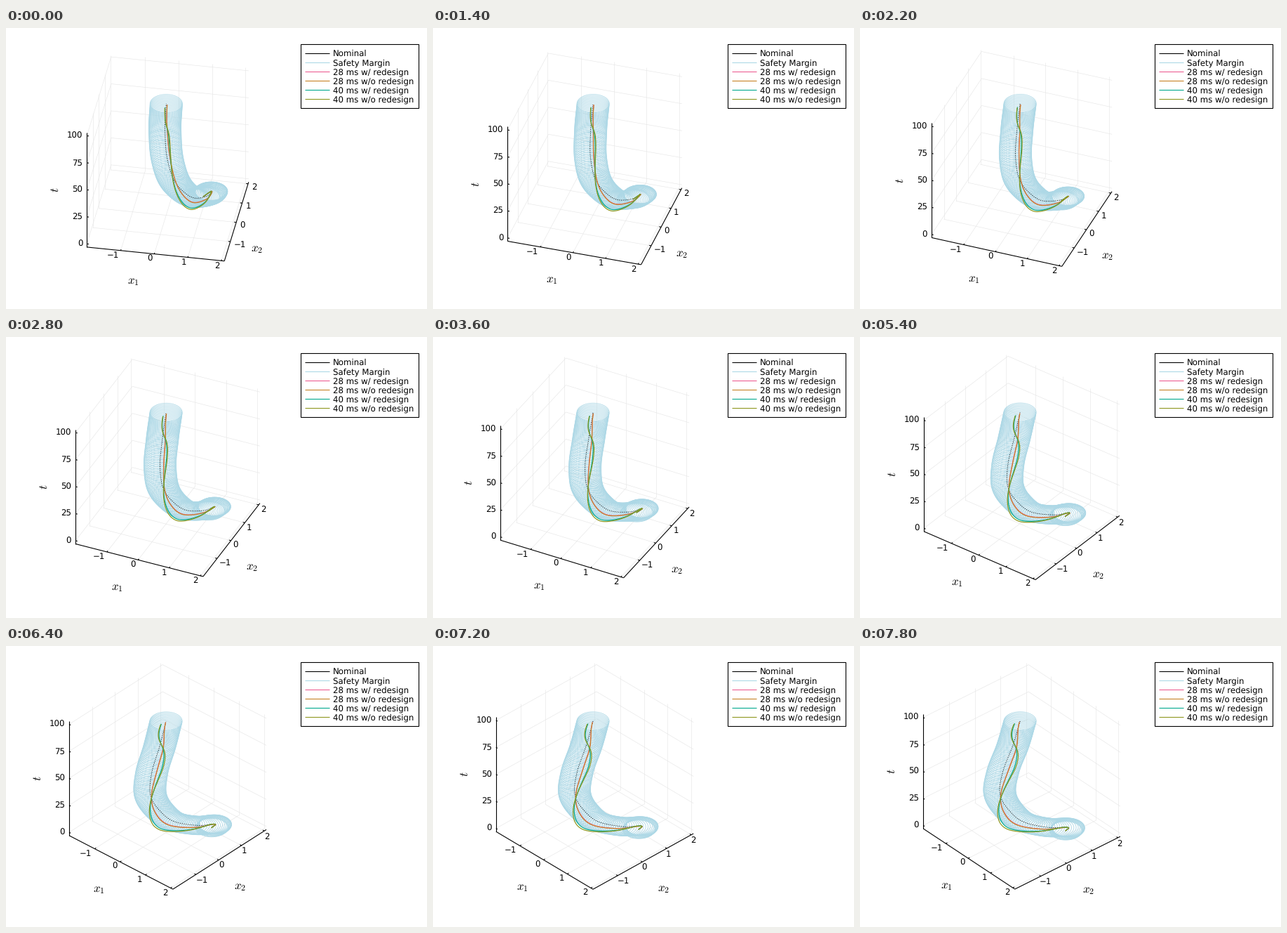
A matplotlib script for the animation above (8 s loop, 600x400 px).

```python
import numpy as np
import matplotlib.pyplot as plt
from matplotlib.animation import FuncAnimation
from matplotlib.collections import LineCollection
from matplotlib.patches import Rectangle

plt.rcParams.update({"font.family": "DejaVu Sans", "mathtext.fontset": "cm",
                     "text.hinting": "none"})

PX = 0.72                       # points per pixel at 100 dpi
FRAMES, STEP_MS = 40, 200
CX, CY = 230.5, 265.6           # middle of the box floor on screen
HALF = 99.5                     # half a box edge in pixels
LO, HI = -2.01, 2.09            # limits of x1 and x2
BOT, TOP = -3, 103              # limits of t
MID, SPAN = (LO + HI) / 2, (HI - LO) / 2
ELEV = np.radians(35)
START_AZ = 10                   # degrees, one more on each step
RADIUS = 0.475
TICKS = range(-1, 3)
Z_TICKS = range(0, 101, 25)
TICK = 0.06

LIGHT, PINK, ORANGE = "#add8e6", "#ed5e93", "#c68225"
TEAL, OLIVE = "#00a98d", "#8e971e"

# time, x1, x2 along the nominal run, relative to the middle of the box
KEYS = np.array([(0, .9, .93), (.08, 1.15, .8), (.18, 1.19, 0),
                 (.28, .94, -.72), (.4, .64, -1.08), (.53, .36, -1.17),
                 (.65, .13, -.85), (.8, -.02, -.35), (1, -.04, -.03)])


def nominal(s):
    """Cubic Hermite curve through the keys."""
    knots, pts = KEYS[:, 0], KEYS[:, 1:] + MID
    slope = np.gradient(pts, knots, axis=0)
    i = np.clip(np.searchsorted(knots, s, side="right") - 1, 0, len(knots) - 2)
    h = (knots[i + 1] - knots[i])[:, None]
    f = (s - knots[i])[:, None] / h
    g = 1 - f
    return (g * g * ((1 + 2 * f) * pts[i] + f * h * slope[i])
            + f * f * ((1 + 2 * g) * pts[i + 1] - g * h * slope[i + 1]))


def swing(s, amp, start, half):
    """Delay error: an oscillation that sets in at start and fades at the end."""
    return amp * (1 - .6 * s ** 4) * np.sin(np.pi * np.maximum(s - start, 0) / half)


def project(x, y, z, az):
    """Orthographic view of data coordinates, in stage pixels."""
    u, v, w = (x - MID) / SPAN, (y - MID) / SPAN, 2 * (z - BOT) / (TOP - BOT)
    c, s = np.cos(az), np.sin(az)
    sx = CX + HALF * (u * c + v * s)
    sy = CY - HALF * (w * np.cos(ELEV) + (v * c - u * s) * np.sin(ELEV))
    return np.stack(np.broadcast_arrays(sx, sy), axis=-1)


time = np.linspace(0, 1, 401)
base = nominal(time)
short_err = np.column_stack([.04 * np.clip(5 * time, 0, 1),
                             swing(time, -.25, .13, .39)])
long_err = np.column_stack([swing(time, -.1, .3, .35),
                            swing(time, -.6, .12, .35)])
paths = [
    (base, "black", 0.9, (0, (1.2, 1.8))),
    (base + .93 * short_err, PINK, 1.1, "-"),
    (base + short_err, ORANGE, 1.2, "-"),
    (base + .88 * long_err, TEAL, 1.2, "-"),
    (base + long_err, OLIVE, 1.2, "-"),
]

ring_t = np.arange(101.0)
ring_mid = nominal(ring_t / 100)
theta = np.linspace(0, 2 * np.pi, 61)
ring_x = ring_mid[:, :1] + RADIUS * np.cos(theta)
ring_y = ring_mid[:, 1:] + RADIUS * np.sin(theta)

grid_ends = []
axis_ends = [((LO, LO, BOT), (LO, LO, TOP)), ((LO, LO, BOT), (HI, LO, BOT)),
             ((HI, LO, BOT), (HI, HI, BOT))]
for k in TICKS:
    grid_ends += [((k, LO, BOT), (k, HI, BOT)), ((k, HI, BOT), (k, HI, TOP)),
                  ((LO, k, BOT), (HI, k, BOT)), ((LO, k, BOT), (LO, k, TOP))]
    axis_ends += [((k, LO, BOT), (k, LO + TICK, BOT)),
                  ((HI, k, BOT), (HI - TICK, k, BOT))]
for k in Z_TICKS:
    grid_ends += [((LO, LO, k), (LO, HI, k)), ((LO, HI, k), (HI, HI, k))]
    axis_ends += [((LO, LO, k), (LO + TICK, LO, k))]
grid_ends, axis_ends = np.array(grid_ends, float), np.array(axis_ends, float)

fig = plt.figure(figsize=(6, 4), dpi=100, facecolor="white")
ax = fig.add_axes([0, 0, 1, 1])
ax.set(xlim=(0, 600), ylim=(400, 0))
ax.axis("off")


def bundle(color, width, z):
    return ax.add_collection(LineCollection([], colors=color, linewidths=width * PX,
                                            zorder=z), autolim=False)


def label(text, ha, size=11.8, **kw):
    return ax.text(0, 0, text, ha=ha, fontsize=size * PX, **kw)


grid = bundle("#e6e6e6", 0.6, 1)
frame_lines = bundle("black", 1.1, 2)
rings = bundle(LIGHT, 0.85, 3)
lines = [ax.plot([], [], color=c, lw=w * PX, ls=ls, zorder=4 + i,
                 dash_capstyle="butt")[0]
         for i, (_, c, w, ls) in enumerate(paths)]

names = [str(k).replace("-", "\u2212") for k in TICKS]
x_labels = [label(n, "right") for n in names]
y_labels = [label(n, "left") for n in names]
z_labels = [label(str(k), "right") for k in Z_TICKS]
x_title = label("$x_1$", "center", 17, va="center")
y_title = label("$x_2$", "center", 17, va="center")
z_title = label("$t$", "center", 17, va="center", rotation=90)

# legend
ax.add_patch(Rectangle((419.5, 23), 168, 90.5, fc="white", ec="black",
                       lw=PX * 1.1, zorder=20))
entries = [("Nominal", "black"), ("Safety Margin", LIGHT),
           ("28 ms w/ redesign", PINK), ("28 ms w/o redesign", ORANGE),
           ("40 ms w/ redesign", TEAL), ("40 ms w/o redesign", OLIVE)]
for i, (name, color) in enumerate(entries):
    y = 36 + 12.95 * i
    ax.plot([425.5, 460.5], [y, y], color=color, lw=1.1 * PX, zorder=21,
            solid_capstyle="butt")
    ax.text(465.7, y + 4.3, name, fontsize=11.8 * PX, zorder=21)


def place(text, point, dx, dy):
    text.set_position((point[0] + dx, point[1] + dy))


def draw(n):
    az = np.radians(START_AZ + n)
    p = n / (FRAMES - 1)
    c, s = np.cos(az), np.sin(az)

    for group, ends in ((grid, grid_ends), (frame_lines, axis_ends)):
        group.set_segments(project(ends[..., 0], ends[..., 1], ends[..., 2], az))
    rings.set_segments(project(ring_x, ring_y, ring_t[:, None], az))
    for line, (path, *_) in zip(lines, paths):
        line.set_data(*project(path[:, 0], path[:, 1], 100 * time, az).T)

    for k, xt, yt in zip(TICKS, x_labels, y_labels):
        place(xt, project(k, LO, BOT, az), -1.5 - 4 * s, 8.3 + 2.3 * c)
        place(yt, project(HI, k, BOT, az), 5 - 6.5 * p, 8.3 + 6 * p - 2.6 * p * p)
    for k, zt in zip(Z_TICKS, z_labels):
        place(zt, project(LO, LO, k, az), -6, 3.7)
    place(x_title, project(MID, LO, BOT, az), -32, 39)
    place(y_title, project(HI, MID, BOT, az), 29.3, 39)
    place(z_title, project(LO, LO, 50, az), -45, 0)
    return []


anim = FuncAnimation(fig, draw, frames=FRAMES, interval=STEP_MS,
                     init_func=lambda: draw(0), repeat=True, repeat_delay=0)
plt.show()
```
